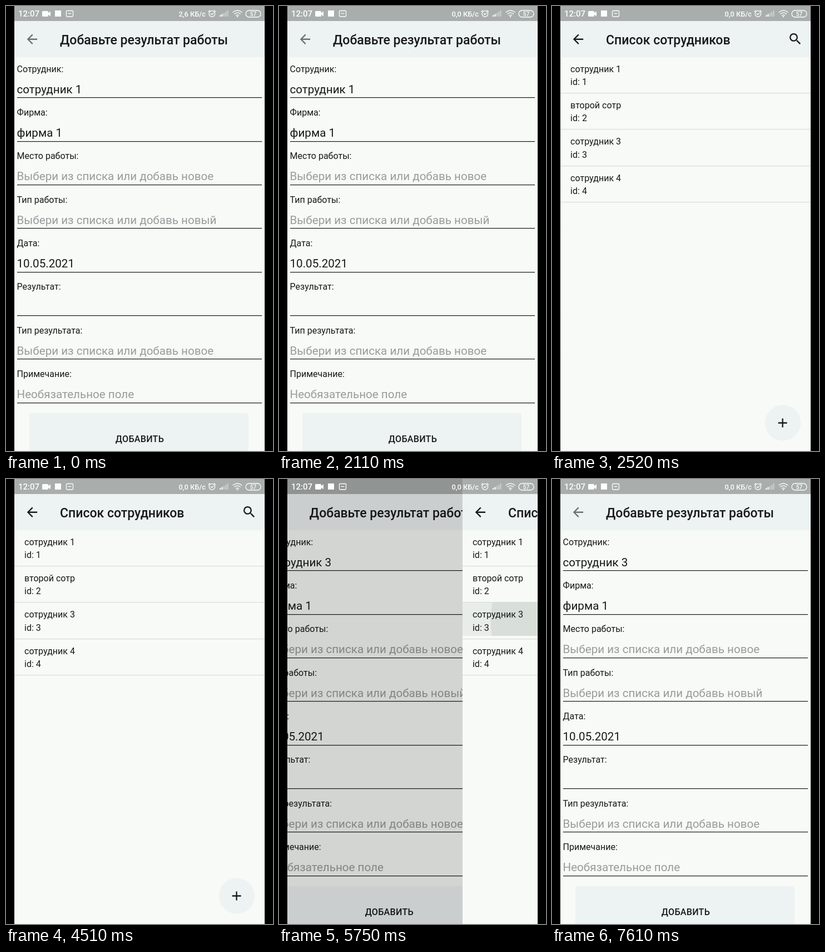
Write an HTML page that moves like this. It is 480x800 px and loops after 7.65 s.

```html
<!DOCTYPE html>
<html lang="ru">
<head>
<meta charset="utf-8">
<style>
  html, body { margin: 0; width: 100%; height: 100%; overflow: hidden; background: #000; }
  svg { display: block; width: 480px; height: 800px; font: 16.04px Roboto, sans-serif; fill: #17191a; }
  .title { font-size: 23px; font-weight: 500; }
  .value { font-size: 20.6px; }
  .hint { fill: #989c9d; }
  .button { font-weight: 500; text-anchor: middle; }
  .status { fill: #fcfefe; font-weight: 500; }
  .line { fill: none; stroke: #fcfefe; stroke-width: 1.3; }
</style>
</head>
<body>
<svg viewBox="0 0 480 800">
  <defs>
    <path id="arrow" transform="translate(33.2 46) scale(1.146)" d="M20 11H7.83l5.59-5.59L12 4l-8 8 8 8 1.41-1.41L7.83 13H20v-2z"/>
    <clipPath id="row"><rect x="15" y="222" width="450" height="60"/></clipPath>
    <g id="page">
      <rect x="15" width="465" height="800" fill="#f7faf6"/>
      <rect x="15" width="465" height="92" fill="#edf2f2"/>
      <rect x="15" width="465" height="27" fill="#a9aeac"/>
    </g>
  </defs>

  <g id="form">
    <use href="#page"/>
    <use href="#arrow" opacity=".6"/>
    <text class="title" x="97" y="69">Добавьте результат работы</text>
    <g id="fields"></g>
    <rect x="42" y="732" width="394" height="68" fill="#edf2f2"/>
    <text class="button" x="240.5" y="784" letter-spacing=".3">ДОБАВИТЬ</text>
    <rect id="scrollbar" x="461" y="92" width="5" height="673" fill="#adb1af"/>
  </g>
  <rect id="shade" x="15" width="450" height="800" fill="#000"/>

  <g id="list">
    <use href="#page"/>
    <use href="#arrow"/>
    <text class="title" x="97" y="69">Список сотрудников</text>
    <path transform="translate(423.5 45.5) scale(1.146)" d="M15.5 14h-.79l-.28-.27A6.47 6.47 0 0 0 16 9.5 6.5 6.5 0 1 0 9.5 16c1.61 0 3.09-.59 4.23-1.57l.27.28v.79l5 4.99L20.49 19l-4.99-5zm-6 0a4.5 4.5 0 1 1 0-9 4.5 4.5 0 0 1 0 9z"/>
    <g id="ripple" clip-path="url(#row)">
      <rect x="15" y="222" width="450" height="60" fill="#e9ede9"/>
      <circle id="wave" cx="240" cy="254" fill="#d8dfd8"/>
    </g>
    <g id="staff"></g>
    <circle cx="415" cy="749.5" r="32" fill="#edf2f2"/>
    <path d="M406.5 749.5h16M414.5 741.5v16" stroke="#17191a" stroke-width="2.3"/>
  </g>

  <g class="status">
    <text x="22" y="19" font-size="15">12:07</text>
    <path d="M65 10.5q0-1.5 1.5-1.5h8q1.5 0 1.5 1.5v2l4-3v9l-4-3v2q0 1.5-1.5 1.5h-8q-1.5 0-1.5-1.5z"/>
    <rect x="88" y="8" width="11" height="11"/>
    <rect class="line" x="108.5" y="8.5" width="12" height="10.5" rx="1.5"/>
    <path class="line" d="M111.5 13.5h6"/>
    <text id="speed" x="359" y="18.5" font-size="12.8" text-anchor="end"></text>
    <g class="line">
      <circle cx="370.3" cy="14" r="5.3"/>
      <path d="M363.5 10.5l3.3-3M377 10.5l-3.3-3M367.8 13.5l2 2 3.3-3"/>
    </g>
    <path d="M384 19v-2.5h2.2V19zM387.4 19v-4.5h2.2V19z"/>
    <path opacity=".4" d="M390.8 19v-6.5h2.2V19zM394.1 19v-8.5h2.2V19zM397.4 19V8h2.2v11z"/>
    <path class="line" d="M407.5 11.5q8.5-7 17 0M410.3 14.5q5.7-4.6 11.4 0M413 17.2q3-2.2 6 0"/>
    <circle cx="416" cy="19" r="1.3"/>
    <rect class="line" x="431" y="8" width="27" height="12" rx="6"/>
    <text x="444.5" y="17.7" font-size="10" text-anchor="middle">57</text>
  </g>

  <path d="M0 0h15v800H0zM465 0h15v800h-15z" fill="#000"/>
</svg>
<script>
const LOOP = 7650, OPEN = 2120, CLOSE = 5662, TAP = 5390;
const $ = id => document.getElementById(id);
const clamp = v => Math.min(1, Math.max(0, v));

// Critically damped spring from 0 to 1
function spring(ms) {
  const x = Math.max(0, ms) * .0274;
  return 1 - (1 + x) * Math.exp(-x);
}

const fields = [
  ['Сотрудник', 'сотрудник 1'],
  ['Фирма', 'фирма 1'],
  ['Место работы', '', 'Выбери из списка или добавь новое'],
  ['Тип работы', '', 'Выбери из списка или добавь новый'],
  ['Дата', '10.05.2021'],
  ['Результат', ''],
  ['Тип результата', '', 'Выбери из списка или добавь новое'],
  ['Примечание', '', 'Необязательное поле']
];
$('fields').innerHTML = fields.map(([label, value, hint], i) => {
  const y = i * 78.35;
  return `<text x="19.5" y="${118.5 + y}">${label}:</text>
    <text class="value ${hint ? 'hint' : ''}" x="19.5" y="${156.5 + y}">${value || hint || ''}</text>
    <rect x="20" y="${Math.round(164.3 + y)}" width="440" height="1.2"/>`;
}).join('');
const employee = document.querySelector('.value');

$('staff').innerHTML = ['сотрудник 1', 'второй сотр', 'сотрудник 3', 'сотрудник 4'].map((name, i) => {
  const y = i * 65.4;
  return `<text x="33" y="${118.5 + y}">${name}</text>
    <text x="33" y="${142 + y}">id: ${i + 1}</text>
    <rect x="15" y="${Math.round(155.7 + y)}" width="450" height="1.2" fill="#d9dcd9"/>`;
}).join('');

const shift = (id, x) => $(id).setAttribute('transform', `translate(${x} 0)`);

function draw(t) {
  // 0 = form in front, 1 = list in front
  const cover = spring(t - OPEN) - spring(t - CLOSE);
  shift('form', -140.6 * cover);
  shift('list', 450 * (1 - cover));
  $('list').setAttribute('visibility', cover > .01 ? 'visible' : 'hidden');
  $('shade').setAttribute('opacity', cover / 2);

  $('ripple').setAttribute('opacity', clamp((t - TAP) / 80));
  $('wave').setAttribute('r', 174 * Math.max(0, t - TAP) / 360);
  $('scrollbar').setAttribute('opacity', t < CLOSE ? 0 : clamp((7050 - t) / 250));

  employee.textContent = 'сотрудник ' + (t < TAP ? 1 : 3);
  $('speed').textContent = (t < 460 ? '2,6' : '0,0') + ' КБ/с';
}

const start = performance.now();
(function tick() {
  draw((performance.now() - start) % LOOP);
  requestAnimationFrame(tick);
})();
</script>
</body>
</html>
```
